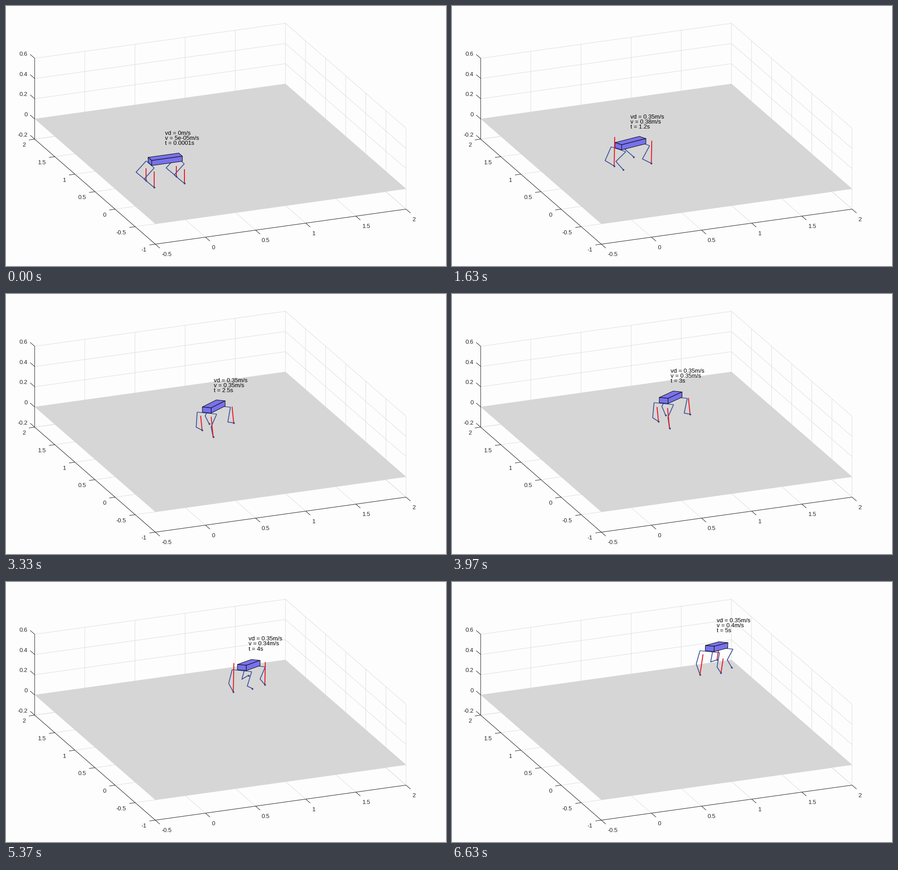
These frames come from a looping animation (974x575 px, 6.66 s). A matplotlib script:

```python
import numpy as np
import matplotlib.pyplot as plt
from matplotlib.animation import FuncAnimation
from matplotlib.patches import Polygon

W, H, DPI = 974, 575, 64
LOOP_MS, TICK_MS, STEPS = 6660, 20, 200
PT = 72 / DPI  # points per pixel
INK, GRID, FLOOR = "#262626", "#dedede", "#d6d6d6"
LEG, FORCE, BODY = "#3c5296", "#e8141e", "#7872ea"

plt.rcParams["font.family"] = "Liberation Sans"
fig = plt.figure(figsize=(W / DPI, H / DPI), dpi=DPI, facecolor="#fdfdfd")
ax = fig.add_axes([0, 0, 1, 1])
ax.set_axis_off()
ax.set_xlim(0, W)
ax.set_ylim(H, 0)


def project(p):
    """Orthographic view: world metres to stage pixels."""
    x, y, z = np.moveaxis(np.asarray(p, float), -1, 0)
    u, v = x + 0.5, y + 1
    return np.stack([330.5 + 222 * u - 89 * v,
                     482 - 31 * u - 77.4 * v - 223.5 * z], -1)


def line(points, color, width=1.0, z=1):
    pts = np.asarray(points, float)
    return ax.plot(pts[:, 0], pts[:, 1], color=color, lw=width * PT, zorder=z,
                   solid_capstyle="butt")[0]


def label(x, y, text, ha="left", color=INK):
    return ax.text(x, y + 4.7, text, size=13 * PT, color=color, ha=ha,
                   va="baseline", zorder=9)


# ---------- static scene ----------
def draw_floor():
    corners = project([(-.5, -1, 0), (2, -1, 0), (2, 2, 0), (-.5, 2, 0)])
    ax.add_patch(Polygon(corners, fc=FLOOR, ec="none", zorder=2))


def draw_axes():
    xs = np.arange(-0.5, 2.1, 0.5)
    ys = np.arange(-1, 2.1, 0.5)
    zs = np.arange(-0.2, 0.61, 0.2)
    for x in xs:
        line(project([(x, -1, -.2), (x, 2, -.2), (x, 2, .6)]), GRID)
    for y in ys:
        line(project([(-.5, y, -.2), (2, y, -.2), (2, y, .6)]), GRID)
    for z in zs:
        line(project([(-.5, 2, z), (2, 2, z), (2, -1, z)]), GRID)

    line(project([(2, -1, -.2), (-.5, -1, -.2), (-.5, 2, -.2), (-.5, 2, .6)]),
         INK, z=3)

    def tick(p, dx, dy):
        a = project(p)
        line([a, a + (dx, dy)], INK, z=3)
        return a

    for x in xs:
        a = tick((x, -1, -.2), 10, 8.7)
        label(a[0] + 13.5, a[1] + 22, f"{x:g}")
    for y in ys:
        a = tick((-.5, y, -.2), -13, 1.8)
        label(a[0] - 20, a[1] + 12, f"{y:g}", "right")
    for z in zs:
        a = tick((-.5, 2, z), -10, -8.7)
        label(a[0] - 16, a[1] - 10.5, f"{round(z, 1) + 0:g}", "right")


draw_floor()
draw_axes()

# ---------- robot ----------
ACC, CRUISE = 0.5, 0.388
RAMP = CRUISE / ACC
BODY_Z, LINK = 0.224, 0.14
HEADING = np.array([0.70, 0.714, 0])
SWING = 0.435
STEP_FRONT, STEP_BACK = 0.08, -0.055

# name: (forward, right, swing start, full force in pixels, zorder)
LEGS = {
    "FL": (1, -1, 0.615, 50, 4),
    "RL": (-1, -1, 0.115, 64, 6),
    "FR": (1, 1, 0.115, 50, 6),
    "RR": (-1, 1, 0.615, 64, 7),
}

EMPTY = [(0, 0)]
leg_lines = {k: line(EMPTY, LEG, 1.8, v[4]) for k, v in LEGS.items()}
force_lines = {k: line(EMPTY, FORCE, 2, v[4]) for k, v in LEGS.items()}
feet = {k: ax.plot([0], [0], "o", ms=4 * PT, mew=0, color="#33497c",
                   zorder=v[4] + .5)[0] for k, v in LEGS.items()}
hip_lines = [line(EMPTY, LEG, 1.5, 4) for _ in range(2)]
faces = [Polygon([(0, 0)] * 3, closed=True, fc=BODY, ec="black", lw=PT,
                 joinstyle="round", zorder=5) for _ in range(3)]
for face in faces:
    ax.add_patch(face)
readout = [label(0, 0, "", color="black") for _ in range(3)]

FACES = [
    [(-1, -1, 1), (1, -1, 1), (1, 1, 1), (-1, 1, 1)],
    [(-1, 1, 1), (1, 1, 1), (1, 1, -1), (-1, 1, -1)],
    [(-1, -1, 1), (-1, 1, 1), (-1, 1, -1), (-1, -1, -1)],
]


def speed(t, phase):
    w = 2 * np.pi * phase
    ripple = .0276 * np.sin(3 * w) + .021 * np.sin(w) - .007 * np.cos(w)
    return min(ACC * t, .3789) + ripple * min(t / RAMP, 1) ** 2


def travel(t):
    return ACC * t * t / 2 if t < RAMP else CRUISE * (t - RAMP / 2)


def step(phase, start):
    """Place in the stride (0 back to 1 front), lift, stance progress."""
    p = (phase - start) % 1
    if p < SWING:
        p /= SWING
        return p * p * (3 - 2 * p), 0.05 * np.sin(np.pi * p), None
    p = (p - SWING) / (1 - SWING)
    return 1 - p, 0, p


def knee(hip, foot, fwd):
    d = foot - hip
    length = np.linalg.norm(d)
    d = d / length
    back = d * fwd.dot(d) - fwd
    back /= np.linalg.norm(back)
    return (hip + foot) / 2 + back * np.sqrt(max(LINK**2 - length**2 / 4, 0))


def force(full, front, p, double):
    if not double:
        return full
    if front:
        return 0.72 * full if p < 0.5 else 0
    return (0.7 if p > 0.5 else 0.5) * full


def body_axes(t):
    """Unit vectors: level forward and right, then body forward, right, up."""
    yaw = np.clip(0.5 * (t - 0.5), 0, 0.75)
    pitch, roll = 0.043 * t, 0.08 * yaw
    flat = np.array([np.cos(yaw), np.sin(yaw), 0])
    side = np.array([np.sin(yaw), -np.cos(yaw), 0])
    fwd = flat * np.cos(pitch) - [0, 0, np.sin(pitch)]
    right = side * np.cos(roll) + [0, 0, np.sin(roll)]
    return flat, side, np.array([fwd, right, np.cross(right, fwd)])


def update(tick):
    n = min(int((tick * TICK_MS + 15) * STEPS / LOOP_MS), STEPS - 1)
    t = n * 0.025
    phase = (n / 18) % 1
    standing = n < 3
    x = travel(t)
    c = np.array([x, 1.022 * x, BODY_Z])
    flat, side, axes = body_axes(t)

    for face, quad in zip(faces, FACES):
        face.set_xy(project(c + (np.array(quad) * (.153, .045, .025)) @ axes))

    steps = {k: step(phase, v[2]) for k, v in LEGS.items()}
    double = all(s[2] is not None for s in steps.values())
    tilt = 0.02 if not double else (0.15 if phase < 0.3 else -0.1)
    stride = min(t / RAMP, 1)
    hips = {}
    for k, (a, b, _, full, _) in LEGS.items():
        s, lift, p = steps[k]
        if standing:
            lift, p = 0, 0.0
        shift = (STEP_BACK + (STEP_FRONT - STEP_BACK) * s) * stride
        spread = 0.1 if a > 0 else 0.1 - 0.018 * stride
        foot = c + flat * 0.15 * a + side * spread * b + HEADING * shift
        foot[2] = lift
        hip = c + np.array([0.15 * a, 0.1 * b, -0.03]) @ axes
        hips[k] = project(hip)
        leg_lines[k].set_data(*project([hip, knee(hip, foot, axes[0]), foot]).T)
        fx, fy = project(foot)
        feet[k].set_data([fx], [fy])

        if standing:
            size, lean = 29 - 2 * a + 4 * b, 0
        elif p is None:
            size, lean = 0, 0
        else:
            size, lean = force(full, a > 0, p, double), tilt
        force_lines[k].set_data([fx, fx + lean * size], [fy, fy - size])
        force_lines[k].set_visible(size > 0)

    for ln, (a, b) in zip(hip_lines, (("FL", "FR"), ("RL", "RR"))):
        ln.set_data(*np.array([hips[a], hips[b]]).T)

    cx, cy = project(c)
    lines = (f"vd = {min(ACC * t, 0.35):.2g}m/s",
             f"v = {speed(t + 1e-4, phase):.2g}m/s",
             f"t = {t + 1e-4:.2g}s")
    for i, (item, text) in enumerate(zip(readout, lines)):
        item.set_text(text)
        item.set_position((cx, cy - 59 + 11.1 * i + 4.7))
    return []


anim = FuncAnimation(fig, update, frames=LOOP_MS // TICK_MS, interval=TICK_MS,
                     repeat=True, repeat_delay=0, blit=False)
plt.show()
```
